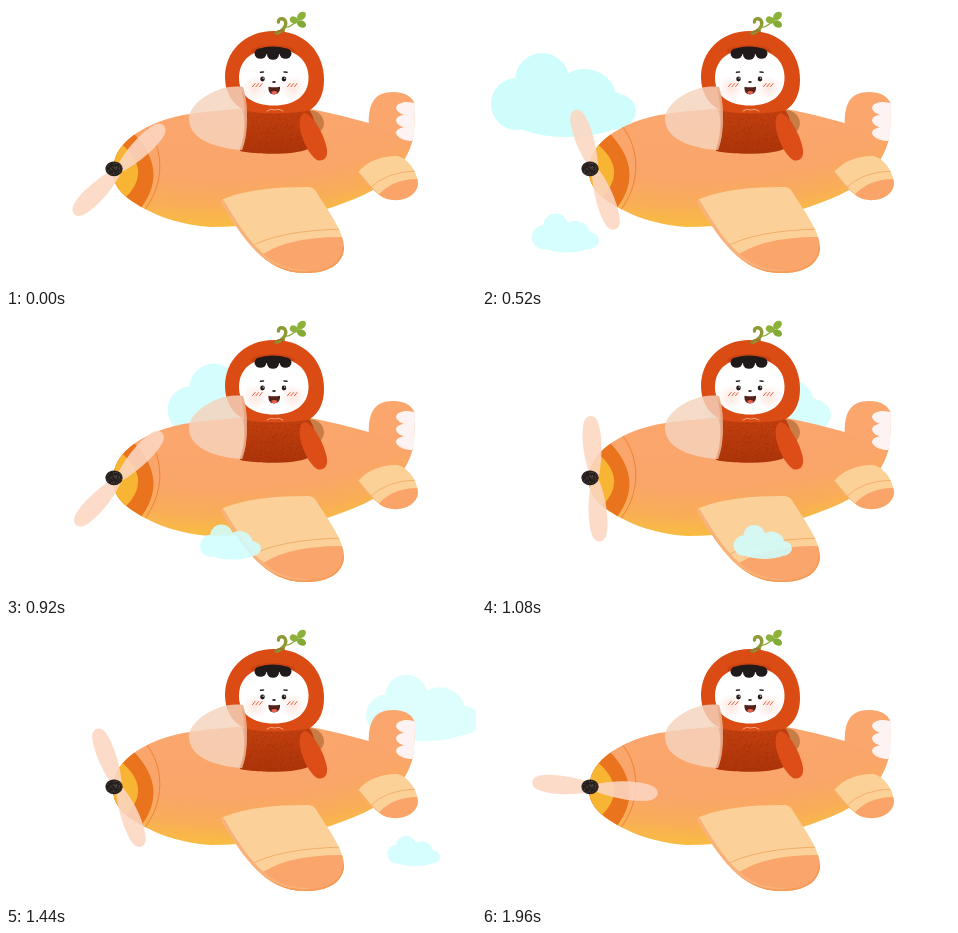
Recreate the animation shown at these times as an HTML page with a canvas. Size 470x281 px, loop 2000 ms.

```html
<!DOCTYPE html>
<html lang="en">
<head>
<meta charset="utf-8">
<title>Little pilot</title>
<style>
html, body { margin: 0; width: 100%; height: 100%; overflow: hidden; background: #fff; }
canvas { display: block; width: 470px; height: 281px; }
</style>
</head>
<body>
<canvas id="stage"></canvas>
<script>
const W = 470, H = 281, LOOP = 2000, STEP = 40;
const canvas = document.getElementById('stage');
const ratio = window.devicePixelRatio || 1;
canvas.width = Math.round(W * ratio);
canvas.height = Math.round(H * ratio);
const ctx = canvas.getContext('2d');
ctx.lineCap = ctx.lineJoin = 'round';

const BODY = new Path2D('M107 165C107 152 113 141 124 132C140 119 162 111 184 108C212 104 280 98 304 103C326 107 345 112 366 118L404 136C402 147 398 157 388 170C372 184 346 195 318 204C284 215 240 221 205 221C170 219 138 206 118 189C110 181 107 174 107 165Z');
const FIN = new Path2D('M363 124C361 98 368 86 387 86C400 86 408 92 409 100L408 124C407 140 401 150 394 160L366 150Z');
const TAIL = new Path2D('M352 166C362 155 375 150 390 150C402 151 412 167 412 178C411 190 396 197 381 193C370 189 362 178 352 166Z');
const WING = new Path2D('M216 197C215 194 217 193 220 192C240 184 270 181 301 181C306 181 309 183 311 187C322 205 338 225 338 242C337 259 321 267 300 267C260 268 236 232 216 197Z');
const HOOD = new Path2D('M268 25C300 25 318 47 318 74C318 88 313 98 304 104C290 108 252 109 238 104C226 98 219 86 219 71C219 46 238 25 268 25Z');
const FACE = new Path2D('M268 43C290 43 302 54 302.5 71C303 90 288 99.500 268 99.500C247 99.500 232.500 90 233 71C233.500 54 246 43 268 43Z');
const TORSO = new Path2D('M236 104L303 104C310 112 312 130 302 143C288 149 254 149 234 145C239 132 241 118 236 104Z');
const SCREEN = new Path2D('M237 81C242 95 243 128 236 144C214 143 184 135 183 114C181 98 212 77 237 81Z');
const BLADE = new Path2D('M2 -4C20 -10 44 -11 57 -7C65 -4 65 4 57 7C44 11 20 9 2 4Z');
const HUB = new Path2D();
HUB.ellipse(108, 162.8, 8.6, 7.4, 0, 0, 7);

function random(seed) {
  return () => (seed = (seed * 16807) % 2147483647) / 2147483647;
}
function specks(seed, n, x, y, w, h) {
  const rnd = random(seed);
  return Array.from({ length: n }, () => [x + rnd() * w, y + rnd() * h]);
}
const torsoSpecks = specks(71, 420, 236, 104, 74, 44);
const hubSpecks = specks(23, 90, 99, 155, 18, 16);

function fill(path, color) {
  ctx.fillStyle = color;
  ctx.fill(typeof path === 'string' ? new Path2D(path) : path);
}
function line(path, color, width) {
  ctx.strokeStyle = color;
  ctx.lineWidth = width;
  ctx.stroke(new Path2D(path));
}
function oval(x, y, rx, ry, color, turn = 0) {
  ctx.fillStyle = color;
  ctx.beginPath();
  ctx.ellipse(x, y, rx, ry, turn, 0, 7);
  ctx.fill();
}
function inside(path, draw) {
  ctx.save();
  ctx.clip(path);
  draw();
  ctx.restore();
}
function dots(list, color) {
  ctx.fillStyle = color;
  for (const [x, y] of list) ctx.fillRect(x, y, 0.8, 0.8);
}
function shade(gradient, ...stops) {
  stops.forEach(([at, color]) => gradient.addColorStop(at, color));
  return gradient;
}

// lobes relative to the cloud's centre: x, y, rx, ry
const LOBES = [[-47, 9, 25.5, 26], [-21.5, -15, 27, 27], [21, 4, 32, 30], [47, 16, 25.5, 19], [4, 21, 60, 21]];
function cloud(x, y, scale, color) {
  ctx.save();
  ctx.translate(x, y);
  ctx.scale(scale, scale);
  ctx.beginPath();
  for (const [cx, cy, rx, ry] of LOBES) {
    ctx.moveTo(cx + rx, cy);
    ctx.ellipse(cx, cy, rx, ry, 0, 0, Math.PI * 2);
  }
  ctx.fillStyle = color;
  ctx.fill();
  ctx.restore();
}

function plane() {
  fill(FIN, '#faa66d');
  inside(FIN, () => {
    for (const y of [103, 115.5, 128]) oval(403, y, 13, 6.8, '#fdf3f2', 0.12);
    ctx.fillStyle = '#fdf3f2';
    ctx.fillRect(405, 97, 6, 36);
  });
  const paint = ctx.createRadialGradient(215, -300, 410, 215, -300, 522);
  fill(BODY, shade(paint, [0, '#faa66d'], [0.55, '#faa56a'], [0.8, '#f9ad58'], [1, '#f8bd40']));
  inside(BODY, () => {
    oval(403, 128, 13, 6.8, '#fdf3f2', 0.12);
    fill('M100 100L122 122Q168 164 131 207L100 210Z', '#e9741d');
    fill('M100 130L113 136Q148 164 119 192L100 196Z', '#f8b433');
    line('M140 120C158 142 160 178 137 206', '#ee8238', 1);
  });
  fill(TAIL, '#fbd198');
  inside(TAIL, () => {
    fill('M370 192Q385 172 414 173L414 200L370 200Z', '#faa46a');
    line('M363 183Q380 165 412 165', '#f3ae6c', 1);
    line('M352 166C362 178 370 190 381 193', '#f6aa64', 1.6);
  });
}

function sprout() {
  line('M270 27C276 26 281 20 279.500 15.500C278 11.500 272 12 272.500 16', '#8f9a36', 3.4);
  line('M269 27.500Q273 24 278 25', '#9a7a2c', 2);
  line('M280 21C284 22 289 17 293 13', '#8bac37', 1.2);
  oval(288, 14, 4.4, 3.3, '#8cb239', 0.5);
  oval(295.5, 10, 5, 3.6, '#8cb239', -0.75);
  oval(295.5, 18, 4.8, 3.5, '#83aa34', 0.5);
}

function hair() {
  fill('M249 48Q252 40.500 267 40.500Q282 40.500 285 48Z', '#211a1a');
  for (const [x, y] of [[254.5, 47.5], [267, 48.5], [279.5, 47.5]]) oval(x, y, 6, 5.2, '#211a1a');
}

function pilot() {
  fill('M302 104C312 104 318 110 318 118C317 124 314 127 310 127Z', '#c87d47');
  const cloth = ctx.createLinearGradient(0, 104, 0, 148);
  fill(TORSO, shade(cloth, [0, '#c13f0f'], [1, '#ac3409']));
  inside(TORSO, () => dots(torsoSpecks, 'rgba(130,38,5,.35)'));
  fill('M299 107C308 110 319 130 321 144C322 152 317 156 311 154C303 149 296 134 294 123C293 114 294 108 299 107Z', '#dc4d17');
  fill(HOOD, '#da4c14');
  oval(267, 45, 22, 6, 'rgba(150,40,10,.22)');
  fill(FACE, '#fff');
  for (const x of [249, 287]) {
    const blush = ctx.createRadialGradient(x, 82, 1, x, 82, 13);
    oval(x, 82, 13, 11, shade(blush, [0, 'rgba(250,205,190,.45)'], [1, 'rgba(250,205,190,0)']));
  }
  hair();
  for (const x of [256.5, 278]) {
    oval(x, 73, 2.3, 2.4, '#251b1a');
    oval(x + 0.7, 72.2, 0.6, 0.6, '#fff');
  }
  line('M254.500 66.300L257.500 65.900M278 65.900L281 66.300', '#302421', 1.5);
  oval(268, 76, 1.8, 1, '#302421');
  fill('M262.500 80.800Q268 81.800 274 80.800C274.500 86 271.500 88.500 268 88.500C264.500 88.500 262 86 262.500 80.800Z', '#542018');
  oval(268.3, 86.5, 3, 1.6, '#ed6453');
  for (const x of [246.5, 281.5]) {
    for (let i = 0; i < 3; i++) {
      const left = x + i * 3.5;
      line(`M${left} 80.700L${left + 2.6} 77.500`, '#e56340', 1);
    }
  }
  line('M261 105Q265 102 268.500 104Q273 102 277 105', '#f3a27b', 1);
  sprout();
}

function screen() {
  fill(SCREEN, 'rgba(246,211,190,.82)');
  inside(SCREEN, () => line('M237 81C242 95 243 128 236 144', 'rgba(226,150,108,.55)', 5));
}

function wing() {
  fill(WING, '#fbd199');
  inside(WING, () => {
    fill('M250 253Q278 230 340 231L340 270L250 270Z', '#faa56b');
    line('M242 242Q272 224 340 223', '#f0ad68', 1);
    line('M216 197C236 232 260 268 300 267', '#f9b17a', 6);
    line('M258 254C270 263 284 267 300 267C321 267 337 259 338 242', '#f69c58', 3.4);
  });
}

function propeller(angle) {
  for (const turn of [0, 180]) {
    ctx.save();
    ctx.translate(113, 163.8);
    ctx.rotate((angle + turn) * Math.PI / 180);
    fill(BLADE, 'rgba(252,215,194,.88)');
    ctx.restore();
  }
  fill(HUB, '#231d1b');
  inside(HUB, () => dots(hubSpecks, '#5b514b'));
}

function draw(t) {
  ctx.setTransform(ratio, 0, 0, ratio, 0, 0);
  ctx.fillStyle = '#fff';
  ctx.fillRect(0, 0, W, H);
  const dt = t - 520;
  const size = 1 - 0.00023 * dt;
  cloud(81.5 + 0.365 * dt, 89 - 0.0056 * dt, size, `rgba(200,253,252,${0.87 - 0.0003 * dt})`);
  plane();
  pilot();
  screen();
  wing();
  propeller(-44.7 + 78.16 * t / STEP);
  cloud(83.5 + 0.3525 * dt, 227, 0.462 * size, 'rgba(209,254,255,.88)');
}

const start = performance.now();
function tick() {
  const t = (performance.now() - start) % LOOP;
  draw(Math.floor(t / STEP) * STEP);
  requestAnimationFrame(tick);
}
tick();
</script>
</body>
</html>
```
